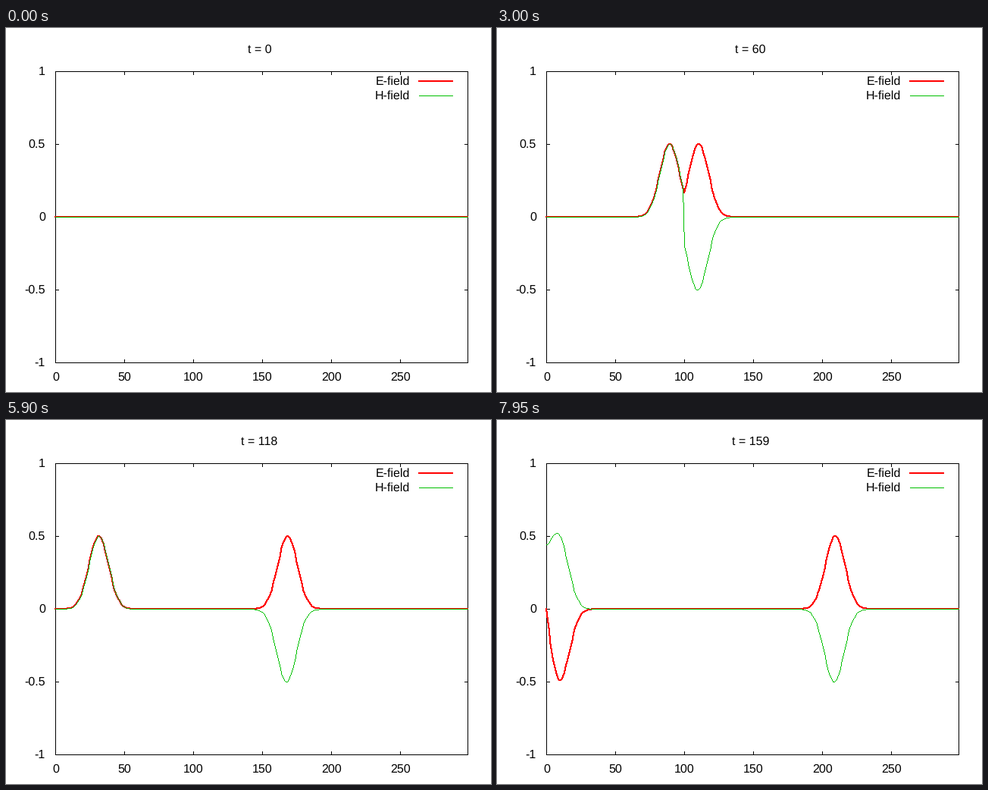
A matplotlib script that plays this animation: 640 by 480 pixels, repeating every 8 s.

```python
import numpy as np
import matplotlib.pyplot as plt
from matplotlib.animation import FuncAnimation

W, H, DPI = 640, 480, 100
LEFT, RIGHT, TOP, BOTTOM = 65, 609, 57, 441
CELLS, STEPS = 300, 160
SOURCE, DELAY, SPREAD = 100, 50, 100
BLACK, RED, GREEN = (0, 0, 0), (255, 0, 0), (0, 192, 0)

plt.rcParams["font.family"] = "Liberation Sans"
plt.rcParams["font.size"] = 16 * 72 / DPI
plt.rcParams["text.hinting"] = "none"


def simulate():
    """1D field stepping with a soft Gaussian source and a mirror at cell 0."""
    e, h = np.zeros(CELLS), np.zeros(CELLS)
    history = []
    for t in range(STEPS):
        h[:-1] += e[1:] - e[:-1]
        e[1:] += h[1:] - h[:-1]
        e[SOURCE] += np.exp(-(t - DELAY) ** 2 / SPREAD)
        history.append((e.copy(), h.copy()))
    return history


def to_x(cell):
    scale = (RIGHT - LEFT) / (CELLS - 1)
    return np.floor(LEFT + np.asarray(cell) * scale + 0.5).astype(int)


def to_y(value):
    mid, half = (TOP + BOTTOM) / 2, (BOTTOM - TOP) / 2
    return np.floor(mid - half * np.asarray(value) + 0.5).astype(int)


def stroke(img, xs, ys, color, width=1):
    """Stepped polyline drawn with a square brush, without smoothing."""
    for x0, y0, x1, y1 in zip(xs[:-1], ys[:-1], xs[1:], ys[1:]):
        n = max(abs(x1 - x0), abs(y1 - y0), 1)
        k = np.arange(n + 1) / n
        px = np.floor(x0 + (x1 - x0) * k + 0.5).astype(int)
        py = np.floor(y0 + (y1 - y0) * k + 0.5).astype(int)
        for dx in range(width):
            for dy in range(width):
                img[py - dy, px - dx] = color


def label(x, y, text, align):
    return fig.text(x / W, 1 - y / H, text, ha=align, va="baseline", color="black")


fig = plt.figure(figsize=(W / DPI, H / DPI), dpi=DPI, facecolor="white")
base = np.full((H, W, 3), 255, dtype=np.uint8)

# Border, and ticks mirrored on the opposite sides
stroke(base, [LEFT, RIGHT, RIGHT, LEFT, LEFT],
       [TOP, TOP, BOTTOM, BOTTOM, TOP], BLACK)
for cell in range(0, 251, 50):
    x = to_x(cell)
    stroke(base, [x, x], [BOTTOM, BOTTOM - 4], BLACK)
    stroke(base, [x, x], [TOP, TOP + 4], BLACK)
    label(x + 0.5, 465, str(cell), "center")
for value in (1, 0.5, 0, -0.5, -1):
    y = to_y(value)
    stroke(base, [LEFT, LEFT + 4], [y, y], BLACK)
    stroke(base, [RIGHT, RIGHT - 4], [y, y], BLACK)
    label(52, y + 5, f"{value:g}", "right")

# Legend
for name, y, color, width in (("E-field", 70, RED, 2), ("H-field", 89, GREEN, 1)):
    label(533, y + 5, name, "right")
    stroke(base, [545, 589], [y, y], color, width)

title = label(334.5, 33, "", "center")
plot = fig.figimage(base, origin="upper")
cells = to_x(np.arange(CELLS))
fields = simulate()


def draw(t):
    e, h = fields[t]
    img = base.copy()
    stroke(img, cells, to_y(e), RED, 2)
    stroke(img, cells, to_y(h), GREEN)
    plot.set_data(img)
    title.set_text(f"t = {t}")
    return plot, title


anim = FuncAnimation(fig, draw, frames=STEPS, interval=50, repeat=True,
                     repeat_delay=0, blit=False)
plt.show()
```
